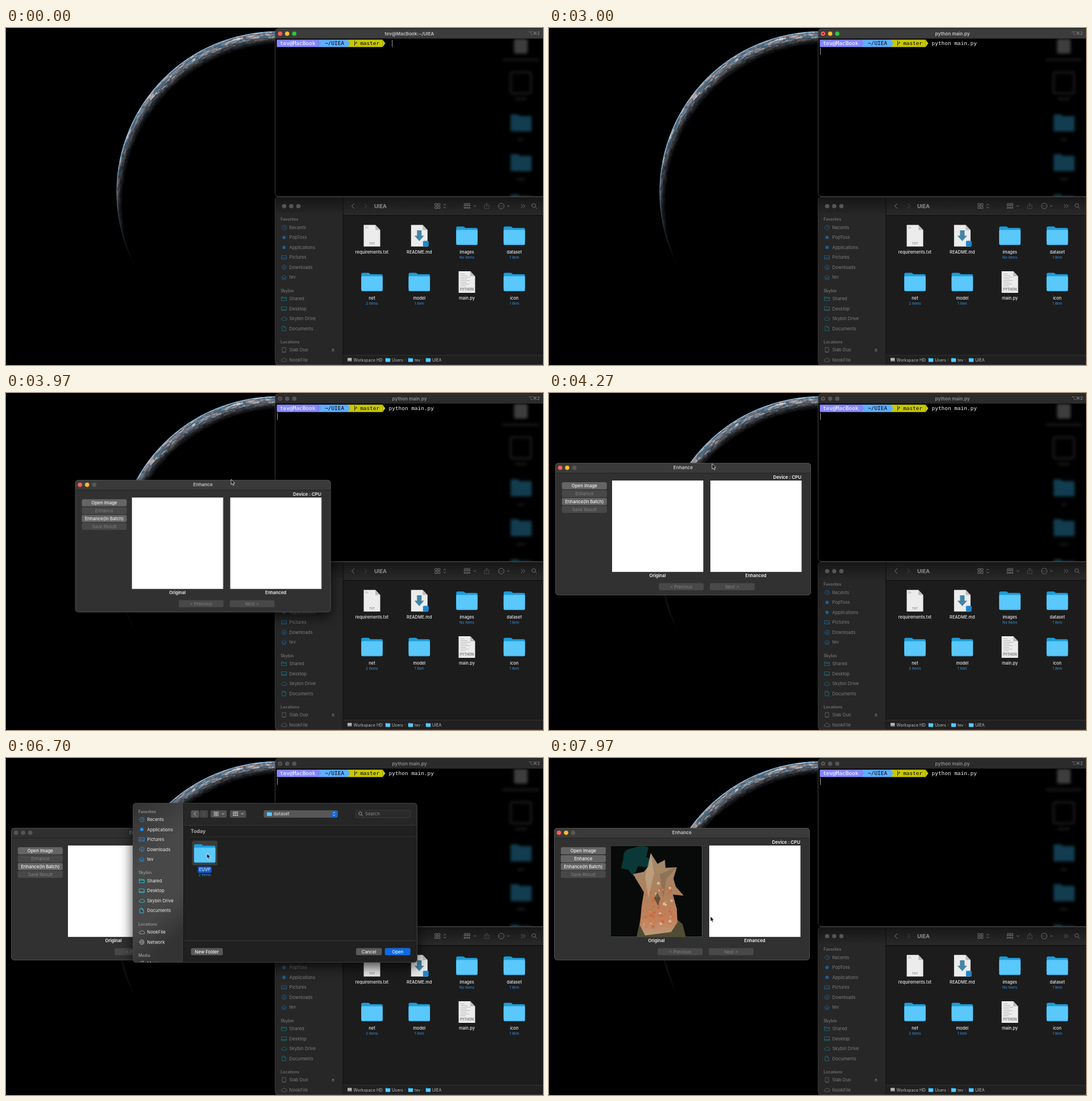
An HTML page with a canvas for the animation above (8000 ms loop, 945 px wide and 593 px high).

```html
<!DOCTYPE html>
<html lang="en">
<head>
<meta charset="utf-8">
<title>Image enhancement demo</title>
<style>
html, body { margin: 0; width: 100%; height: 100%; overflow: hidden; background: #000; }
canvas, svg { position: absolute; left: 0; top: 0; width: 945px; height: 593px; }
text { font-family: Inter, "Open Sans", sans-serif; white-space: pre; }
.mono { font-family: "DejaVu Sans Mono", monospace; }
.blur { filter: blur(2.4px); }
.shadow { filter: drop-shadow(0 7px 11px rgba(0,0,0,.75)); }
</style>
</head>
<body>
<canvas id="earth" width="945" height="593"></canvas>
<svg id="stage" viewBox="0 0 945 593"></svg>
<script>
const LOOP = 8000, CELL = 5.65, USER = 'tev';
const $ = id => document.getElementById(id);

let seed = 7;
const rnd = () => (seed = seed * 16807 % 2147483647) / 2147483647;

// ---------- drawing helpers ----------
const rect = (x, y, w, h, fill, r = 0, more = '') =>
  `<rect x="${x}" y="${y}" width="${w}" height="${h}" rx="${r}" fill="${fill}" ${more}/>`;
const path = (d, fill, more = '') => `<path d="${d}" fill="${fill}" ${more}/>`;
const line = (d, color, w = 1) =>
  path(d, 'none', `stroke="${color}" stroke-width="${w}" stroke-linecap="round" stroke-linejoin="round"`);
const dot = (x, y, r, fill) => `<circle cx="${x}" cy="${y}" r="${r}" fill="${fill}"/>`;
const at = (x, y, body, scale = 1) => `<g transform="translate(${x} ${y}) scale(${scale})">${body}</g>`;
const group = (id, body, more = '') => `<g id="${id}" ${more}>${body}</g>`;
const text = (x, y, s, size, fill, weight = 400, anchor = 'start', cls = '') =>
  `<text x="${x}" y="${y + size * .36}" font-size="${size}" fill="${fill}" font-weight="${weight}" text-anchor="${anchor}" class="${cls}">${s}</text>`;
const mid = (x, y, s, size, fill, weight) => text(x, y, s, size, fill, weight, 'middle');
const lights = (x, y, colors) => colors.map((c, i) => dot(x + i * 12.5, y, 3.8, c)).join('');
const button = (x, y, w, s, on, fill = on ? '#656565' : '#484848', h = 12.5) =>
  rect(x, y - h / 2, w, h, fill, 2.5) + mid(x + w / 2, y, s, 7.8, on ? '#f2f2f2' : '#808080', on ? 500 : 400);

const RING = 'M-4 0a4 4 0 1 0 8 0a4 4 0 1 0-8 0';
const ICONS = {
  clock: RING + 'M0-2.2V0H1.8',
  picture: 'M-4.3-3h8.6v6h-8.6zM-4 2l2.6-2.6 2 2 1.2-1 2.2 2',
  down: RING + 'M0-2V2M-1.6.4L0 2 1.6.4',
  home: 'M-4.3 0L0-4 4.3 0M-3-1V3.8H-1V1H1V3.8H3V-1',
  shared: 'M-4.3-3.2h3l1 1h4.6v5.6h-8.6zM-4.3-1h8.6',
  desktop: 'M-4.3-3.2h8.6v6.4h-8.6zM-4.3 1.8h8.6',
  cloud: 'M-2.6 3a2 2 0 0 1 0-4a3 3 0 0 1 5.6 0a2 2 0 0 1 0 4z',
  doc: 'M-3-4h3.5L3-1.5V4h-6zM.5-4v2.5H3',
  pad: 'M-2.8-4.2h5.6v8.4h-5.6zM-.6 3h1.2',
  globe: RING + 'M-4 0h8M0-4c-2.6 2.5-2.6 5.5 0 8c2.6-2.5 2.6-5.5 0-8',
  music: 'M-2 3V-3L3-4V2',
  grid: 'M-4.3-4.3h3.4v3.4h-3.4zM.9-4.3h3.4v3.4H.9zM-4.3.9h3.4v3.4h-3.4zM.9.9h3.4v3.4H.9z',
  rows: 'M-5-4.5h10M-5-2.5h2v2h-2zM-1-2.5h2v2h-2zM3-2.5h2v2h-2zM-5 2h2v2h-2zM-1 2h2v2h-2zM3 2h2v2h-2z',
  share: 'M-2-1.5h-2v6h8v-6h-2M0 1.5V-5M-2-3l2-2 2 2',
  more: 'M-5 0a5 5 0 1 0 10 0a5 5 0 1 0-10 0M-2.2 0h.1M0 0h.1M2.2 0h.1',
  search: 'M-4-1a3.2 3.2 0 1 0 6.4 0a3.2 3.2 0 1 0-6.4 0M1.6 1.4L4.4 4.2',
  left: 'M2-4L-2 0 2 4', right: 'M-2-4L2 0-2 4',
  drop: 'M-2-1L0 1 2-1', updown: 'M-2-1.5L0-3.7 2-1.5M-2 1.5L0 3.7 2 1.5',
  twice: 'M-3.5-3L-.5 0-3.5 3M.5-3L3.5 0 .5 3'
};
const icon = (kind, x, y, color, scale = 1) =>
  at(x, y, kind === 'spot' ? dot(0, 0, 3, color) : line(ICONS[kind], color, .9), scale);

const folder = () =>
  path('M-18.8-13.8q0-2.5 2.5-2.5h9.5q1.5 0 2.6 1.1l1.4 1.4H16.3q2.5 0 2.5 2.5V10h-37.6z', '#1d9cd8') +
  path('M-18.8-8.2q0-2 2-2h33.6q2 0 2 2V13.8q0 2.5-2.5 2.5h-32.6q-2.5 0-2.5-2.5z', '#5ac8fb') +
  rect(-18, 15, 36, .9, '#3fb0e6', .4);
const page = body =>
  path('M-14.5-19H6L14.5-10V19h-29z', '#ececec') + path('M6-19L14.5-10H6z', '#bdbdbd') + body;
const codeLines = Array.from({ length: 8 }, (_, i) =>
  rect(-11, -15 + i * 3, 7 + (i * 5) % 11, .9, '#b5b5b5')).join('');
const ART = {
  folder,
  txt: () => page(rect(-12, -16, 4, .8, '#aaa') + rect(-12, -14, 6, .8, '#aaa') + mid(0, 13.3, 'TXT', 5.2, '#666')),
  py: () => page(codeLines + rect(-13, 9.5, 26, 7, '#e2e2e2') + mid(0, 13.3, 'PYTHON', 5.6, '#555')),
  md: () => page(path('M-4-9.5h8V0H8.5L0 9.5-8.5 0H-4z', '#4385a6') + rect(6.5, 9, 10, 10, '#1f87cf', 1.5)),
  photo: () => at(-16, -16, photo(), .2)
};
const item = (x, y, name, kind = 'folder', sub = '', color = '#eaeaea') =>
  at(x, y, ART[kind]()) + mid(x, y + 28.5, name, 7.4, color, 500) + mid(x, y + 38, sub, 6.2, '#3f93e6');
const dim = s => `<g opacity=".55">${s}</g>`;

// ---------- photo, 160 px square ----------
function photo() {
  let s = rect(0, 0, 160.5, 160.5, '#080a09');
  s += path('M22 22Q20 6 40 4Q52-2 66 3L62 20 76 26 62 38 48 36 40 54 30 42 18 40z', '#0a413f', 'opacity=".85"');
  s += path('M45 161L52 128 66 140 95 132 112 126 126 138 132 161z', '#4f4c36');
  s += path('M39 50L58 46 66 36 70 13 82 32 95 25 96 39 116 38 110 58 114 72 128 88 109 86 116 112 117 135 106 152 60 158 51 140 54 106 58 82 46 62z', 'url(#coral)');
  s += path('M70 13L76 48 66 92 60 54z', '#cfb794', 'opacity=".5"') + path('M116 38L98 58 92 92 86 50z', '#7d6850', 'opacity=".6"');
  for (let i = 0; i < 60; i++)
    s += `<circle cx="${58 + rnd() * 52}" cy="${66 + rnd() * 78}" r="${.6 + rnd() * 2.2}" fill="${i % 3 ? '#d0602f' : '#ead0b4'}" opacity=".65"/>`;
  return s + path('M76 92l6-9 5 10-4 13z', '#45382c', 'opacity=".7"');
}

// ---------- side bars ----------
const NAV = {
  Recents: 'clock', PopToss: 'spot', Applications: 'spot', Pictures: 'picture', Downloads: 'down', [USER]: 'home',
  Shared: 'shared', Desktop: 'desktop', 'Skybin Drive': 'cloud', Documents: 'doc',
  'Slab Duo': 'pad', NookFile: 'cloud', Network: 'globe', Music: 'music'
};
function sidebar(x, sections, look) {
  return sections.map(([title, y, color, names]) =>
    text(x, y, title, 7, look.head, 600) +
    names.map((n, i) => {
      const cy = y + 14.3 + i * 17.5;
      return icon(NAV[n], x + 6, cy, look[color]) + text(x + 15.3, cy, n, 7.8, look.text);
    }).join('')).join('');
}
const CLOUD = ['Shared', 'Desktop', 'Skybin Drive', 'Documents'];

// ---------- terminal ----------
function terminal() {
  const tip = (x, c) => path(`M${x} 20.5h.3l4.8 6.5-4.8 6.5h-.3z`, c);
  const ghost = y => path(`M888 ${y}h13l3 3h21v27h-37z`, '#123d50');
  const caption = (y, w) => rect(906 - w / 2, y, w, 4, '#181818');
  const mono = (x, s, c) => text(x, 27, s, 9.4, c, 400, 'start', 'mono');
  const typed = [...'python main.py'].map((c, i) => `<tspan id="key${i}">${c}</tspan>`).join('');
  const bar = (c, d) => rect(474, 1.5, 480, 17, c, 0) + line('M474 18.8H945', d, .8);
  return `<g clip-path="url(#term)">` + rect(474, 1, 480, 295, '#000') +
    `<g class="blur">` + rect(894, 19, 24, 26, '#3d3d3d', 3) + caption(54, 64) +
    rect(888, 78, 36, 37, 'none', 3, 'stroke="#1f1f1f" stroke-width="3"') + caption(123, 20) +
    ghost(152) + caption(194, 10) + ghost(222) + caption(264, 14) + ghost(293) + '</g>' +
    group('termOn', bar('#3c3c3c', '#222') + lights(482.3, 10, ['#ff5f57', '#febc2e', '#28c840'])) +
    group('termOff', bar('#2b2b2b', '#1a1a1a') + lights(482.3, 10, ['#555', '#555', '#555'])) +
    group('busy', dot(482.3, 10, 1.3, '#5c1512')) +
    group('titleShell', mid(710, 10, USER + '@MacBook:~/UIEA', 8.1, '#c4c4c4', 600)) +
    group('titleRun', mid(710, 10, 'python main.py', 8.1, '#c4c4c4', 600)) +
    group('titleIdle', mid(710, 10, 'python main.py', 8.1, '#8c8c8c', 600)) +
    text(919.5, 9.5, '⌥⌘2', 7.6, '#777', 600) + '</g>' +
    rect(476.5, 20.5, 73, 13, '#8787ff') + rect(549.5, 20.5, 51.5, 13, '#5fafff') + tip(549.5, '#8787ff') +
    rect(601, 20.5, 61.5, 13, '#c9c900') + tip(601, '#5fafff') + tip(662.4, '#c9c900') +
    mono(482.2, USER + '@MacBook', '#fff') + mono(561.2, '~/UIEA', '#000') + mono(623.2, 'master', '#000') +
    line('M613.5 22.5V31M613.5 29Q616.5 28 616.5 25.5M615.2 26.2L616.5 24.5 617.8 26.2', '#222', .9) +
    mono(673.6, typed, '#f0f0f0') +
    group('caret', rect(0, 0, 1, 12.5, '#a5a5a5')) +
    rect(473.6, 1, 485, 295.4, 'none', 6, 'stroke="#4c4c4c" stroke-width=".9"');
}

// ---------- file browser ----------
function browser() {
  const g = '#777', small = (x, s, gap) => at(x, 584, folder(), .22) + text(x + 7, 584, s, 7.2, '#bdbdbd') +
    (gap ? icon('right', gap, 584, '#999', .42) : '');
  return `<g clip-path="url(#brow)">` + rect(474, 297, 480, 300, '#1c1c1c') + rect(474, 297, 119, 300, '#272727') +
    rect(593, 297, 360, 32.5, '#292929') + rect(474, 297, 480, 32, 'url(#shade)') +
    rect(592.5, 297, 1, 300, '#0c0c0c') + rect(593, 329.3, 360, 1, '#0b0b0b') +
    lights(489.5, 313.5, ['#555', '#555', '#555']) +
    sidebar(483.3, [
      ['Favorites', 336.8, 'a', ['Recents', 'PopToss', 'Applications', 'Pictures', 'Downloads', USER]],
      ['Skybin', 462, 'b', CLOUD], ['Locations', 552.2, 'c', ['Slab Duo', 'NookFile']]
    ], { head: '#707070', text: '#7d7d7d', a: '#1a5f92', b: '#1d6b7c', c: '#636363' }) +
    path('M573 567l2.5-3.4 2.5 3.4zM573 568h5v1h-5z', '#666') +
    icon('left', 610.5, 313.3, '#8a8a8a') + icon('right', 633, 313.3, '#4d4d4d') +
    text(648, 313.3, 'UIEA', 9.3, '#8f8f8f', 700) +
    [['grid', 759.5], ['updown', 772], ['rows', 811.5], ['drop', 825], ['more', 871.5], ['drop', 884],
      ['twice', 910], ['search', 929.5]].map(([k, x]) => icon(k, x, 313.3, g)).join('') + icon('share', 846, 313.3, '#4d4d4d') +
    item(644, 365.5, 'requirements.txt', 'txt') + item(727.3, 365.5, 'README.md', 'md') +
    item(811, 365.5, 'images', 'folder', 'No items') + item(894.5, 365.5, 'dataset', 'folder', '1 item') +
    item(644, 447, 'net', 'folder', '2 items') + item(727.3, 447, 'model', 'folder', '1 item') +
    item(811, 447, 'main.py', 'py') + item(894.5, 447, 'icon', 'folder', '1 item') +
    rect(593, 575.5, 360, 30, '#202020') + rect(593, 575.5, 360, .8, '#383838') +
    rect(601, 580.5, 7.5, 6.5, '#b5b5b5', 1) + rect(601, 585, 7.5, 2, '#777') +
    text(611.5, 584, 'Workspace HD', 7.2, '#bdbdbd') + icon('right', 662.5, 584, '#999', .42) +
    small(672, 'Users', 702.5) + small(712, USER, 733) + small(743, 'UIEA') + '</g>' +
    rect(473.6, 297.2, 485, 295.4, 'none', 6, 'stroke="#424242" stroke-width=".9"');
}

// ---------- enhance window, 450 x 233 ----------
function app() {
  const head = (bg, fg, cols) => path('M0 18V6Q0 0 6 0H444Q450 0 450 6V18z', bg) +
    lights(8.6, 8.6, cols) + mid(225, 8.4, 'Enhance', 8.2, fg, 600);
  return rect(0, 0, 450, 233, '#313131', 6) +
    group('appOn', head('#3a3a3a', '#c9c9c9', ['#ff5f57', '#febc2e', '#595959'])) +
    group('appOff', head('#303030', '#808080', ['#555', '#555', '#555'])) +
    rect(0, 17.6, 450, .8, '#1f1f1f') +
    button(11.8, 40.3, 79, 'Open Image', 1) + button(11.8, 54.2, 79, 'Enhance', 0) +
    group('ready', button(11.8, 54.2, 79, 'Enhance', 1)) +
    button(11.8, 67.9, 79, 'Enhance(In Batch)', 1) + button(11.8, 81.8, 79, 'Save Result', 0) +
    text(433, 25.5, 'Device : CPU', 7.9, '#f5f5f5', 600, 'end') +
    rect(100, 31, 160.5, 160.8, '#fff') + rect(273, 31, 160.5, 160.8, '#fff') +
    group('loaded', at(100, 31.2, photo())) +
    mid(180, 198.2, 'Original', 7.7, '#f5f5f5', 600) + mid(353, 198.2, 'Enhanced', 7.7, '#f5f5f5', 600) +
    button(182.2, 217.8, 79, '&lt; Previous', 0) + button(272, 217.8, 79, 'Next &gt;', 0) +
    rect(.4, .4, 449.2, 232.2, 'none', 6, 'stroke="#5b5b5b" stroke-width=".8"');
}

// ---------- open dialog ----------
function dialog() {
  const ink = '#dcdcdc';
  const place = s => text(471, 98.3, s, 7.9, '#e6e6e6');
  const pick = (id, w) => group(id, rect(327.5, 145.5, 44.5, 43.5, '#3c3c3c', 3) +
    rect(349.7 - w / 2, 191, w, 11, '#0b5bd3', 2));
  const first = (s, kind, sub) => item(349.7, 168, s, kind, sub);
  const back = c => icon('left', 332.5, 98.3, c, .75);
  return `<g clip-path="url(#dlg)">` + rect(223, 79, 501, 281, '#202020') + rect(223, 79, 89.5, 281, 'url(#side)') +
    rect(312.3, 79, 411, 39, '#262626') + rect(312.3, 117.8, 411, .9, '#3a3a3a') + rect(325, 138.3, 399, .8, '#343434') +
    rect(312.3, 321, 411, .9, '#383838') + rect(312, 79, .8, 281, '#111') +
    sidebar(233, [
      ['Favorites', 94, 'a', ['Recents', 'Applications', 'Pictures', 'Downloads', USER]],
      ['Skybin', 201.8, 'b', CLOUD], ['Locations', 292.2, 'c', ['NookFile', 'Network']], ['Media', 347.2, 'c', ['Music']]
    ], { head: '#959595', text: '#ececec', a: '#1690ff', b: '#2fc4dc', c: '#a5a5a5' }) + '</g>' +
    rect(325.5, 92, 14.5, 13, '#555', 2.5) + rect(341, 92, 14.5, 13, '#444', 2.5) + icon('right', 348, 98.3, '#777', .75) +
    rect(360, 92, 28.5, 13, '#505050', 2.5) + icon('grid', 370, 98.3, ink, .8) + icon('drop', 382, 98.3, ink) +
    rect(394, 92, 28.5, 13, '#505050', 2.5) + icon('rows', 404, 98.3, ink, .8) + icon('drop', 416, 98.3, ink) +
    rect(453.5, 92, 130.5, 13, '#575757', 3) + at(463.5, 98.3, folder(), .23) +
    rect(572, 93, 10.5, 11, '#0b66de', 2.5) + icon('updown', 577.2, 98.3, '#fff', .9) +
    rect(615.5, 92, 96, 13, '#2b2b2b', 3, 'stroke="#414141" stroke-width=".8"') +
    icon('search', 624, 98.5, '#bbb', .85) + text(632, 98.3, 'Search', 7.8, '#888') +
    text(325, 128.5, 'Today', 8.8, '#ababab', 700) +
    group('viewRoot', place('UIEA') + back('#777') + text(712, 128.5, 'Show Less', 6.8, '#d0d0d0', 600, 'end') +
      pick('pickSet', 36) + first('dataset', 'folder', '1 item') +
      item(419.8, 168, 'icon', 'folder', '1 item') + item(490, 168, 'images', 'folder', 'No items') +
      dim(item(560, 168, 'main.py', 'py')) + item(630.3, 168, 'model', 'folder', '1 item') +
      item(349.7, 249.5, 'net', 'folder', '2 items') + dim(item(419.8, 249.5, 'README.md', 'md')) +
      dim(item(490, 249.5, 'requirements.txt', 'txt'))) +
    group('viewSet', place('dataset') + back('#eee') + pick('pickSub', 24.5) + first('EUVP', 'folder', '2 items')) +
    group('viewSub', place('EUVP') + back('#eee') + pick('pickFile', 38) + first('test1.jpg', 'photo') +
      item(419.8, 168, 'test2.jpg', 'photo')) +
    button(325.5, 340.8, 56, 'New Folder', 1, '#595959') + button(616, 340.8, 45.3, 'Cancel', 1, '#595959') +
    button(666.7, 340.8, 45, 'Open', 0, '#3a3a3a') + group('canOpen', button(666.7, 340.8, 45, 'Open', 1, '#0b6be2')) +
    rect(223.4, 79.4, 500, 280.2, 'none', 6, 'stroke="#4a4a4a" stroke-width=".8"');
}

$('stage').innerHTML = `<defs>
  <clipPath id="term">${rect(473.6, 1, 485, 295.4, '#000', 6)}</clipPath>
  <clipPath id="brow">${rect(473.6, 297.2, 485, 300, '#000', 6)}</clipPath>
  <clipPath id="dlg">${rect(223, 79, 501, 281, '#000', 6)}</clipPath>
  <linearGradient id="coral" x2="0" y2="1"><stop stop-color="#a08a6c"/><stop offset=".45" stop-color="#ac815e"/><stop offset=".8" stop-color="#c47f58"/><stop offset="1" stop-color="#bd9a7a"/></linearGradient>
  <linearGradient id="side" x2=".25" y2="1"><stop stop-color="#323232"/><stop offset=".4" stop-color="#484848"/><stop offset=".75" stop-color="#484848"/><stop offset="1" stop-color="#333"/></linearGradient>
  <linearGradient id="shade" x2="0" y2="1"><stop stop-opacity=".45"/><stop offset="1" stop-opacity="0"/></linearGradient>
</defs>` + terminal() + browser() +
  group('app', app(), 'class="shadow"') + group('dialog', dialog(), 'class="shadow"') +
  group('mouse', path('M0 0V9.2L2.1 7.3 3.6 10.6 5.2 9.9 3.8 6.7H6.6z', '#000', 'stroke="#fff" stroke-width=".8"'));

// ---------- planet ----------
(function planet() {
  const c = $('earth').getContext('2d'), cx = 477, cy = 288.5, R = 282.5;
  const tones = ['#f4efee', '#d8b3a6', '#a5796c', '#7d9db5', '#e3d0c9', '#3b5f7b', '#c9998a'];
  const arc = (r, a, b) => { c.beginPath(); c.arc(cx, cy, r, a, b); };
  c.save();
  arc(R, 0, 7); c.clip();
  c.fillStyle = '#4b6377'; c.fillRect(0, 0, 945, 593);
  for (let i = 0; i < 1500; i++) {
    const a = 2.9 + rnd() * 2, r = R - 1 - rnd() * 30;
    c.globalAlpha = .3 + rnd() * .5;
    c.strokeStyle = tones[rnd() * tones.length | 0];
    c.lineWidth = .5 + rnd() * 1.8;
    arc(r, a, a + .01 + rnd() * .04); c.stroke();
  }
  c.globalAlpha = 1; c.strokeStyle = '#8cc0e6'; c.lineWidth = 2.6;
  arc(R, 0, 7); c.stroke();
  c.restore();
  // The night side is a soft disc pushed away from the sun.
  const x = cx + 11, y = cy + 22.5, night = c.createRadialGradient(x, y, R, x, y, R + 16);
  night.addColorStop(0, '#000'); night.addColorStop(.4, 'rgba(0,0,0,.75)'); night.addColorStop(1, 'rgba(0,0,0,0)');
  c.fillStyle = night; c.fillRect(0, 0, 945, 593);
})();

// ---------- motion ----------
const start = document.timeline.currentTime;
function play(id, frames) {
  $(id).animate(frames, { duration: LOOP, iterations: Infinity }).startTime = start;
}
// Hidden until the first given time, then flips at each one.
function show(id, ...times) {
  const frames = times.map((t, i) => ({ offset: t / LOOP, opacity: (i + 1) % 2, easing: 'step-end' }));
  if (times[0] > 0) frames.unshift({ offset: 0, opacity: 0, easing: 'step-end' });
  play(id, [...frames, { offset: 1, opacity: times.length % 2 }]);
}
// Holds the first place before its time and the last place after.
function move(id, steps, easing = 'linear') {
  const key = ([t, x, y]) => ({ offset: t / LOOP, transform: `translate(${x}px,${y}px)`, easing });
  const [t, x, y] = steps[0], last = steps[steps.length - 1];
  play(id, [...(t ? [key([0, x, y])] : []), ...steps.map(key), key([LOOP, last[1], last[2]])]);
}

const KEYS = [60, 200, 340, 480, 620, 780, 1030, 1170, 1300, 1430, 1560, 1690, 1820, 2130];
const RUN = 2570, OPEN = 3330, ASK = 5100, DONE = 7570;

KEYS.forEach((t, i) => show('key' + i, t));
KEYS.forEach((t, i) => play('key' + i, [
  { offset: 0, fill: 'transparent', easing: 'step-end' },
  { offset: t / LOOP, fill: '#f0f0f0' }, { offset: 1, fill: '#f0f0f0' }]));
move('caret', [[0, 673.6, 21], ...KEYS.map((t, i) => [t, 673.6 + CELL * (i + 1), 21]), [2300, 758.4, 21], [RUN, 476.5, 34.5]], 'step-end');

show('termOn', 0, OPEN);
show('termOff', OPEN);
show('busy', 2970);
show('titleShell', 0, RUN);
show('titleRun', RUN, OPEN);
show('titleIdle', OPEN);

show('app', OPEN);
move('app', [[3600, 248, 187], [3970, 122, 153], [4130, 54, 134], [4270, 11, 123], [4360, 9, 123]]);
show('appOn', 0, ASK, DONE);
show('appOff', ASK, DONE);
show('ready', DONE);
show('loaded', DONE);

show('dialog', ASK, DONE);
show('viewRoot', ASK, 6100);
show('viewSet', 6100, 6870);
show('viewSub', 6870, DONE);
show('pickSet', 5830, 6100);
show('pickSub', 6480, 6870);
show('pickFile', 7300, DONE);
show('canOpen', 5830, 6100, 6480, 6870, 7300, DONE);

show('mouse', 0, 60, 3400);
move('mouse', [[0, 591.5, 489.5], [3390, 591.5, 489.5], [3400, 540, 280], [3600, 522, 187], [3970, 396.5, 152], [4130, 329, 135],
  [4270, 287, 124.5], [4360, 284, 124.5], [4440, 278, 126], [4620, 130, 150], [4780, 62, 161], [5080, 62, 161],
  [5330, 194, 184.5], [5550, 300, 175], [5720, 353.5, 168], [7560, 353.5, 168], [7700, 335, 205], [7950, 284, 278.5]]);
</script>
</body>
</html>
```
